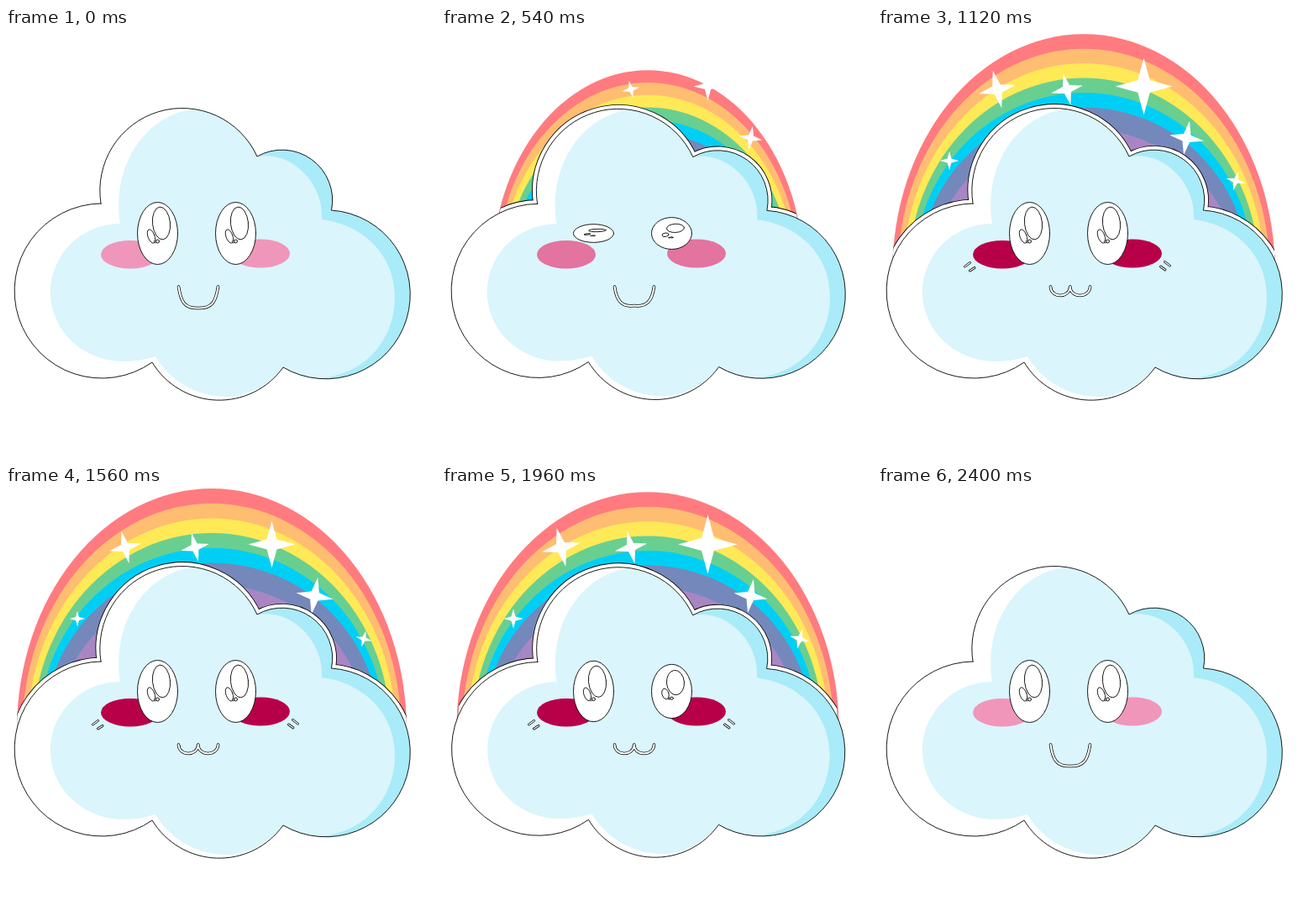
Recreate the animation shown at these times as an HTML page with a canvas. Size 512 by 512 pixels, loop 2540 ms.

```html
<!DOCTYPE html>
<html lang="en">
<head>
<meta charset="utf-8">
<title>Rainbow cloud</title>
<style>
  html, body { margin: 0; height: 100%; overflow: hidden; background: #fff; }
  canvas { display: block; }
</style>
</head>
<body>
<canvas id="stage" width="512" height="512"></canvas>
<script>
const ctx = document.getElementById('stage').getContext('2d');
const LOOP = 2540, REST = 2400, TAU = Math.PI * 2;

const cloud = new Path2D(`M113 209A98 98 0 0 1 299 153A60 60 0 0 1 387.500 217
  A100.500 100.500 0 1 1 330 404A93.400 93.400 0 0 1 174 398A104 104 0 1 1 113 209Z`);
const shade = new Path2D('M299 153A60 60 0 0 1 387.5 217A100.5 100.5 0 1 1 330 404Z');
const body = new Path2D(`M222 97C170 103 125 160 136 233C90 233 53 270 53 315
  C53 360 92 397 140 397C155 397 168 394 178 391C195 420 228 440 265 439
  C292 438 315 422 330 404C345 414 360 417 378 417C430 410 463 370 463 320
  C463 270 425 234 376 228C379 185 340 146 300 153A98 98 0 0 0 222 97Z`);
const bands = ['#ff7b7f', '#ffbd72', '#ffe957', '#69cf90', '#00cff5', '#7488bc', '#a886c4'];

// x, y, radius, extra radius at full pulse, tilt
const stars = [
  [142, 73, 19, 5, -.23], [225, 73, 17, 3, -.23], [316.5, 69.5, 27, 9, 0],
  [367.5, 131, 22.5, -2.5, .17], [85, 158, 9, 3, 0], [426, 182, 9.5, 3, .26]
];

const clamp = v => Math.min(1, Math.max(0, v));
const ramp = (t, a, b) => clamp((t - a) / (b - a));
const smooth = u => u * u * (3 - 2 * u);
const mix = (a, b, k) => a + (b - a) * k;
const wave = u => (1 - Math.cos(TAU * u)) / 2;

function at(x, y, sx, sy, angle, draw) {
  ctx.save();
  ctx.translate(x, y);
  ctx.rotate(angle);
  ctx.scale(sx, sy);
  draw();
  ctx.restore();
}

function ellipse(x, y, rx, ry, angle = 0) {
  ctx.beginPath();
  ctx.ellipse(x, y, rx, ry, angle, 0, TAU);
}

function stroke(color, width, path) {
  ctx.strokeStyle = color;
  ctx.lineWidth = width;
  path ? ctx.stroke(path) : ctx.stroke();
}

function inkLine(outer, inner) {
  stroke('#000', outer);
  stroke('#fff', inner);
}

function dome(i) {
  const inset = i > 5 ? 8 : 0;
  ctx.beginPath();
  ctx.ellipse(0, 0, 232 - 6.5 * i - inset, 287 - 17.7 * i - inset, 0, Math.PI, TAU);
  ctx.closePath();
}

function rainbow(size) {
  at(245, 290, size ** 1.25, size, 0, () => bands.forEach((color, i) => {
    dome(i);
    ctx.fillStyle = color;
    ctx.fill();
  }));
}

function star([x, y, r, extra, tilt], size, pulse) {
  const k = (r + extra * pulse) * size;
  at(x, y, k, k, tilt, () => {
    ctx.beginPath();
    for (let i = 0; i < 8; i++) {
      const d = i % 2 ? .3 : 1, a = i * TAU / 8;
      ctx.lineTo(d * Math.cos(a), d * Math.sin(a));
    }
    ctx.fillStyle = '#fff';
    ctx.fill();
  });
}

function drawCloud(breath, size) {
  const s = 1 - .008 * breath;
  at(245, 290, s, s, 0, () => {
    // The white rim shows only against the rainbow
    if (size > 0) {
      ctx.save();
      ctx.scale(size ** 1.25, size);
      dome(0);
      ctx.scale(size ** -1.25, 1 / size);
      ctx.clip();
      ctx.translate(-245, -290);
      stroke('#000', 10.5, cloud);
      stroke('#fff', 8.8, cloud);
      ctx.restore();
    }
    ctx.translate(-245, -290);
    for (const [path, color] of [[cloud, '#fff'], [shade, '#a9ebf8'], [body, '#daf5fb']]) {
      ctx.fillStyle = color;
      ctx.fill(path);
    }
    stroke('#000', .9, cloud);
  });
}

function eye(x, open) {
  const s = Math.max(open, .03);
  const oval = (dx, dy, rx, ry, tilt = 0) => {
    ellipse(x + dx, 244.5 + dy * s, rx, ry, tilt * s);
    ctx.fillStyle = '#fff';
    ctx.fill();
    stroke('#000', .9);
  };
  const squash = s * s;
  oval(0, 0, 24, 37 * s);
  oval(4.5, -12, 10.5, 19.5 * squash, -.1);
  oval(-7.5, 3.5, 4, 8.5 * squash, -.35);
  oval(0, 9.5, 2, 2 * squash);
  oval(-3, 10, 1, 1.5 * squash);
}

function mouth(k) {
  const low = mix(334, 322, k);
  ctx.beginPath();
  ctx.moveTo(205.5, 308);
  ctx.bezierCurveTo(mix(208, 206, k), mix(325, 322, k), mix(212, 228, k), low, 228.8, mix(333.5, 308, k));
  ctx.bezierCurveTo(mix(246, 229, k), low, mix(250, 252, k), mix(325, 322, k), 252.5, 308);
  inkLine(3.6, 2.1);
}

function cheekMarks(k) {
  ctx.globalAlpha = k;
  for (const [x1, y1, x2, y2] of [[103.5, 284, 109.5, 279.5], [109.5, 289, 115, 285.5],
    [341.5, 278.5, 347.5, 283], [336.5, 284, 342, 288]]) {
    ctx.beginPath();
    ctx.moveTo(x1, y1);
    ctx.lineTo(x2, y2);
    inkLine(2.8, 1.3);
  }
  ctx.globalAlpha = 1;
}

const openness = t => 1 - wave(ramp(t, 330, 610)) - wave(ramp(t, 1928, 2208));

function draw(t) {
  const grow = 1 - (1 - ramp(t, 120, 828)) ** 2;
  const settle = t > 760 ? .015 * wave((t - 760) / 800) : 0;
  const size = Math.max(0, grow - settle - ramp(t, 2120, 2440) ** 2);
  const twinkle = ramp(t, 400, 625) - ramp(t, 2120, 2320);
  const pulse = t > 850 ? wave((t - 850) / 790) : 0;
  const breath = Math.sin(Math.PI * ramp(t % 1120, 440, 1000));
  const mood = smooth(ramp(t, 440, 760)) - smooth(ramp(t, 2120, 2380));

  ctx.fillStyle = '#fff';
  ctx.fillRect(0, 0, 512, 512);
  ctx.lineCap = ctx.lineJoin = 'round';
  if (size > 0) rainbow(size);
  if (twinkle > 0) stars.forEach(s => star(s, twinkle, pulse));
  drawCloud(breath, size);

  ctx.fillStyle = `rgb(${mix(240, 184, mood)},${mix(150, 0, mood)},${mix(186, 72, mood)})`;
  ellipse(148, 269.7, 35, 16.8);
  ctx.fill();
  ellipse(303, 268.5, 35, 17);
  ctx.fill();
  eye(180.5, openness(t - 20));
  eye(273.5, openness(t));
  mouth(mood ** 1.5);
  cheekMarks(ramp(mood, .4, 1));
}

function tick() {
  draw(Math.min(performance.now() % LOOP, REST));
  requestAnimationFrame(tick);
}
tick();
</script>
</body>
</html>
```
